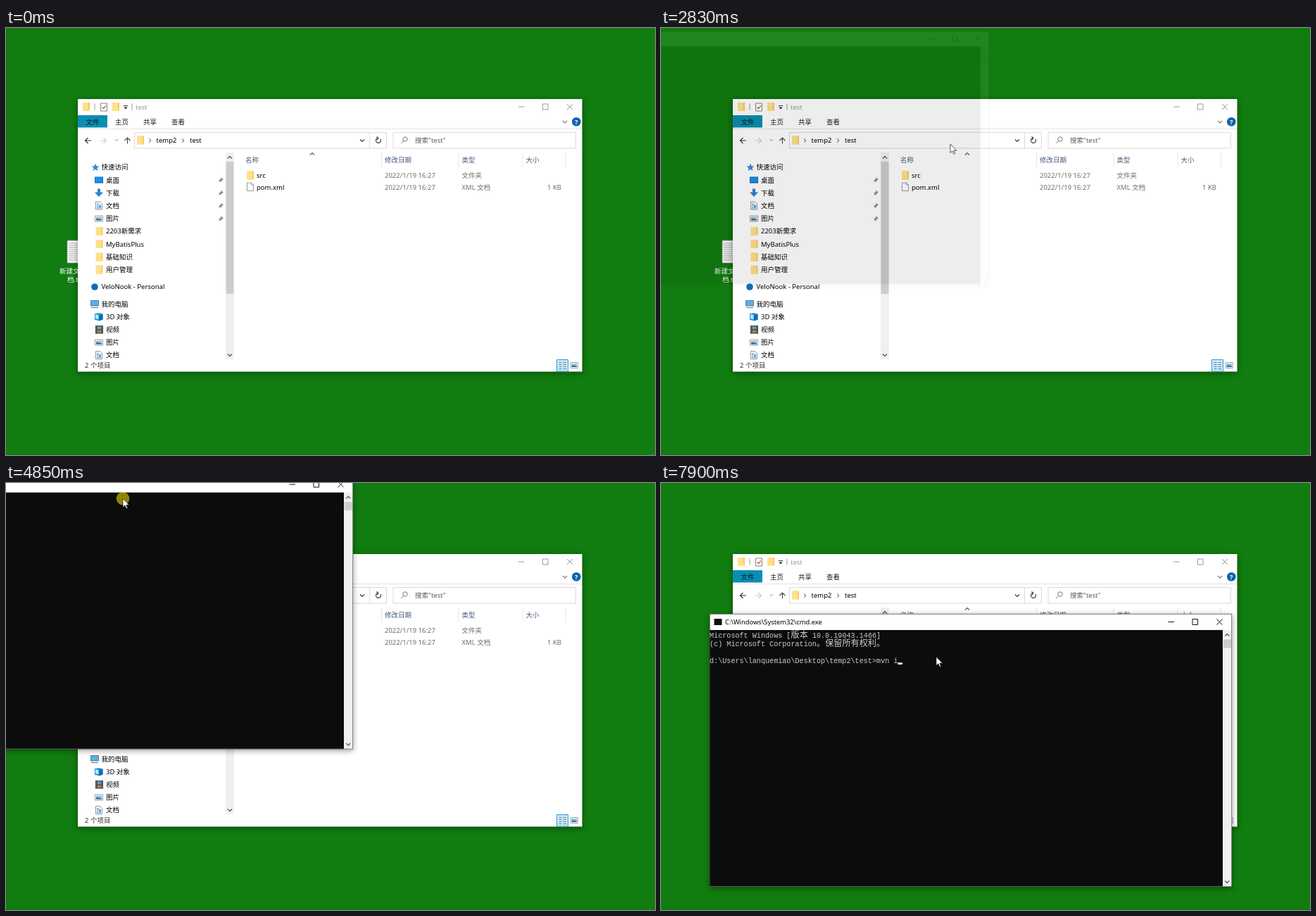
An HTML page for the animation above (8000 ms loop, 922 px wide and 607 px high).

```html
<!DOCTYPE html>
<html lang="zh-CN">
<head>
<meta charset="utf-8">
<title>Open a console in a folder</title>
<style>
html, body { margin: 0; width: 100%; height: 100%; overflow: hidden; background: #117c10; }
svg { display: block; }
#stage { width: 100vw; height: 100vh; }
text { font: 9.5px "Noto Sans", "Noto Sans CJK SC", "Noto Sans CJK", sans-serif; white-space: pre; }
.head { fill: #43597a; }
.dim { fill: #6d6d6d; }
.line { fill: none; stroke: currentColor; }
.edge { fill: none; stroke: #d9d9d9; }
.mono text { font: 10.13px "Liberation Mono", monospace; fill: #ccc; }
.mono .cjk { font: 300 12.15px "Noto Sans CJK SC", "Noto Sans CJK", sans-serif; }
.shade { filter: drop-shadow(0 2px 4px rgba(0,0,0,.4)); }
.ime text { fill: #1f76dc; font-size: 13px; }
.ime .n { font-size: 9.5px; }
.ime .first { fill: #f0321e; font-size: 14.5px; }
.ime .pale { fill: #e3a9a4; font-size: 9.5px; }

/* 1% of the loop is 80 ms */
.a { animation: 8s step-end infinite; }
.title { animation-name: title; }
.focus { animation-name: focus; }
.crumbs { animation-name: crumbs; }
.edit { animation-name: edit; }
.path { animation-name: path; }
.go { animation-name: go; }
.reload { animation-name: reload; }
.c { animation-name: c; }
.cm { animation-name: cm; }
.cmd { animation-name: cmd; }
.tall { animation-name: tall; }
.short { animation-name: short; }
.hover1 { animation-name: hover1; }
.hover2 { animation-name: hover2; }
.drag { animation-name: drag; }
.open { animation-name: open; animation-timing-function: linear; transform-origin: 371px 194px; }
.mvn { animation-name: mvn; }
.i { animation-name: i; }
.caret { animation-name: caret; }
.ime1 { animation-name: ime1; }
.ime2 { animation-name: ime2; }
.ime3 { animation-name: ime3; }
.move { animation-name: move; }
.arrow { animation-name: arrow; }
.beam { animation-name: beam; }
.press { animation-name: press; }

@keyframes title { 0%, 35.25%, 100% { color: #999 } 11.125% { color: #111 } }
@keyframes focus { 0%, 35.25%, 100% { opacity: 0 } 11.125% { opacity: 1 } }
@keyframes crumbs { 0%, 32.75%, 100% { opacity: 1 } 12% { opacity: 0 } }
@keyframes edit { 0%, 32.75%, 100% { opacity: 0 } 12% { opacity: 1 } }
@keyframes path { 0%, 21.125%, 100% { opacity: 0 } 12% { opacity: 1 } }
@keyframes go { 0%, 32.75%, 100% { opacity: 0 } 21.125% { opacity: 1 } }
@keyframes reload { 0%, 32.75%, 100% { opacity: 1 } 21.125% { opacity: 0 } }
@keyframes c { 0%, 23.625%, 100% { opacity: 0 } 21.125% { opacity: 1 } }
@keyframes cm { 0%, 25.25%, 100% { opacity: 0 } 23.625% { opacity: 1 } }
@keyframes cmd { 0%, 32.75%, 100% { opacity: 0 } 25.25% { opacity: 1 } }
@keyframes tall { 0%, 26.125%, 100% { opacity: 0 } 22% { opacity: 1 } }
@keyframes short { 0%, 32.75%, 100% { opacity: 0 } 26.125% { opacity: 1 } }
@keyframes hover1 { 0%, 8.1%, 100% { opacity: 0 } 7.1% { opacity: 1 } }
@keyframes hover2 { 0%, 7.1%, 100% { opacity: 0 } 6.1% { opacity: 1 } }
@keyframes open {
  0%, 35.25% { opacity: 0; transform: scale(.92) }
  36.125% { opacity: .45; transform: scale(.965) }
  37% { opacity: .81; transform: scale(.991) }
  38.5%, 100% { opacity: 1; transform: scale(1) }
}
@keyframes drag {
  0% { transform: translate(-249px, -9.5px) }
  61.5% { transform: translate(-153px, 55.5px) }
  62.25% { transform: translate(-13px, 146.5px) }
  63.125% { transform: translate(67px, 197.5px) }
  64% { transform: translate(70px, 189.5px) }
  64.875%, 100% { transform: translate(69px, 186px) }
}
@keyframes mvn { 0% { opacity: 0 } 91.25%, 100% { opacity: 1 } }
@keyframes i { 0% { opacity: 0 } 98.75%, 100% { opacity: 1 } }
@keyframes caret {
  0%, 75.5%, 88.75% { opacity: 0; transform: none }
  68.875%, 82.125% { opacity: 1; transform: none }
  91.25% { opacity: 1; transform: translateX(18.2px) }
  95.375% { opacity: 0; transform: translateX(24.3px) }
  96.25% { opacity: 1; transform: translateX(24.3px) }
  98.75%, 100% { opacity: 1; transform: translateX(30.4px) }
}
@keyframes ime1 { 0%, 84.625%, 100% { opacity: 0 } 82.125% { opacity: 1 } }
@keyframes ime2 { 0%, 86.25%, 100% { opacity: 0 } 84.625% { opacity: 1 } }
@keyframes ime3 { 0%, 91.25%, 100% { opacity: 0 } 86.25% { opacity: 1 } }
@keyframes move {
  0% { transform: translate(330px, 441px) }
  .875% { transform: translate(330px, 441px); animation-timing-function: ease-in-out }
  6.5% { transform: translate(412px, 228px); animation-timing-function: linear }
  10.25% { transform: translate(411px, 168px) }
  11.125% { transform: translate(411px, 165px) }
  49.625% { transform: translate(411px, 165px); animation-timing-function: ease-in-out }
  59% { transform: translate(149px, 9px) }
  60.625% { transform: translate(166px, 22px) }
  61.5% { transform: translate(245px, 74px) }
  62.25% { transform: translate(385px, 165px) }
  63.125% { transform: translate(465px, 216px) }
  64% { transform: translate(468px, 208px) }
  64.875% { transform: translate(467px, 204px) }
  67.375% { transform: translate(467px, 204px); animation-timing-function: ease-in-out }
  72% { transform: translate(425px, 318px); animation-timing-function: ease-in-out }
  76.125%, 100% { transform: translate(391px, 247px) }
}
@keyframes arrow { 0%, 11.125% { opacity: 0 } .875%, 33.625%, 100% { opacity: 1 } }
@keyframes beam { 0%, 21.125%, 33.625%, 100% { opacity: 0 } 11.125%, 28.625% { opacity: 1 } }
@keyframes press { 0%, 13%, 67.375%, 100% { opacity: 0 } 11.125%, 60.625% { opacity: 1 } }
</style>
</head>
<body>
<svg id="stage" viewBox="0 0 922 607">
<defs>
  <g id="folder"><path d="M1 0h9v12H1z" fill="#f3ca5c"/><path d="M0 0h8v9l2 3H0z" fill="#ffe08a"/></g>
  <g id="file"><path d="M.5.5h6l3 3v8.500h-9z" fill="#fff" stroke="#8c8c8c" stroke-width=".9"/><path d="M6.500.5v3h3" class="line" color="#8c8c8c" stroke-width=".8"/></g>
  <g id="doc"><path d="M1.500.5h6l3 3v8h-9z" fill="#fff" stroke="#7d8b98" stroke-width=".9"/><path d="M3 3.500h3M3 5.500h6M3 7.500h2M3 9.500h6" stroke="#4b8fc4"/><path d="M6 6.500h3v2H6z" fill="#3f86c0"/></g>
  <g id="pic"><path d="M.5.5h11v8H.5z" fill="#fff" stroke="#8795a1" stroke-width=".9"/><path d="M2 2h8v5H2z" fill="#8fc4e8"/><path d="M2 4l4 1 4 .5V7H2z" fill="#39668a"/></g>
  <g id="screen"><path d="M0 0h12v9H0z" fill="#0b5fae"/><path d="M.7.7h10.600v7H.7z" fill="#1893ee"/></g>
  <path id="pin" d="M4 0l3.500 3.500-1.500.4-1.600 1.700-.2 1.800-1.500-1.500L0 8l2-2.800L.6 3.800l1.800-.2L4 2z" fill="#878c92"/>
  <path id="down" d="M-3-1.500L0 1.500 3-1.500" class="line" stroke-width="1.1"/>
  <path id="up" d="M-3 1.500L0-1.500 3 1.500" class="line" stroke-width="1.1"/>
  <path id="right" d="M-1.300-2.500L1.300 0-1.300 2.500" class="line"/>
  <path id="left-arrow" d="M9 0H.5M4.500-4L.5 0l4 4" class="line" stroke-width="1.1"/>
  <path id="controls" d="M0 0h8.500M34.500-4H42v8h-7.500zM69-4l8 8M77-4l-8 8" class="line"/>
  <g id="ime-tools">
    <circle cx="524" cy="269" r="8" fill="#fcdcd4"/>
    <g color="#1f76dc"><use href="#right" x="503" y="289" color="#c9dcf2" transform="rotate(180 503 289)"/><use href="#right" x="514" y="289"/><use href="#down" x="526" y="289"/></g>
  </g>
</defs>

<rect width="922" height="607" fill="#117c10"/>

<g id="desktop">
  <path d="M87 302h25v32H87z" fill="#fff" stroke="#8a8a8a" stroke-width=".8"/>
  <path d="M89 306h20M89 309h20M89 312h20M89 315h20M89 318h20M89 321h20M89 324h20M89 327h20M89 330h20" stroke="#9a9a9a" stroke-width=".9"/>
  <g fill="#fff"><text x="76" y="348.500">新建文本文</text><text x="87" y="361">档.txt</text></g>
</g>

<g id="explorer">
  <rect x="102" y="101" width="716.500" height="387.500" fill="#fff" class="shade"/>
  <rect x="101.500" y="100.500" width="717.500" height="388.500" fill="none" stroke="#2c5a30" class="a focus"/>

  <use href="#folder" x="109" y="106"/>
  <path d="M126 107.500v9M179 107.500v9" stroke="#999"/>
  <path d="M134.500 107h9v11h-9z" fill="#fff" stroke="#777" stroke-width=".9"/>
  <path d="M136.500 112.500l2 2 3.500-4" class="line" color="#b36a2e" stroke-width="1.200"/>
  <use href="#folder" x="151" y="106"/>
  <path d="M167 110.500h6" stroke="#333"/><path d="M167.200 112.500h5.600L170 115.500z" fill="#333"/>
  <g class="a title"><text x="184" y="115.500" fill="currentColor">test</text><use href="#controls" x="728" y="112"/></g>

  <path d="M102 124h42v17.500h-42z" fill="#0a8fb2"/>
  <g fill="#1d1d1d"><text x="113.500" y="136.500" fill="#04181f">文件</text><text x="155" y="136.500">主页</text><text x="195" y="136.500">共享</text><text x="235" y="136.500">查看</text></g>
  <use href="#down" x="794" y="133.500" color="#777"/>
  <circle cx="810.300" cy="133.300" r="6.300" fill="#0a63ae"/><text x="810.300" y="137" text-anchor="middle" fill="#fff" style="font-weight:700">?</text>
  <path d="M102 143.500h716" stroke="#e3e3e3"/>

  <use href="#left-arrow" x="112" y="160" color="#333"/>
  <use href="#left-arrow" x="134" y="160" color="#ccc" transform="rotate(180 138.500 160)"/>
  <use href="#down" x="157" y="159.500" color="#666" transform="translate(47.100 47.850) scale(.7)"/>
  <use href="#left-arrow" x="168" y="160" color="#444" transform="rotate(90 172.500 160)"/>

  <path d="M182.500 148.500h358v22.500h-358zM516.500 148.500v22.500M550 148.500h259.500v22.500H550z" class="edge"/>
  <g class="a crumbs">
    <use href="#folder" x="186" y="153.500"/>
    <g color="#333"><use href="#right" x="204.500" y="160"/><use href="#right" x="251.500" y="160"/><use href="#down" x="506" y="160"/></g>
    <text x="213.500" y="163">temp2</text><text x="261" y="163">test</text>
  </g>
  <g color="#333"><path class="a line reload" d="M532 158a3.500 3.500 0 1 1-4-1.500M526.500 154.500l2.500 2-2 2.500" stroke-width="1.100"/></g>
  <circle cx="567" cy="158" r="3.200" class="line" color="#777"/><path d="M564.800 160.300l-3.300 3.500" stroke="#777"/>
  <text x="581" y="163" fill="#5c5c5c">搜索"test"</text>

  <use href="#up" x="435" y="179" color="#555"/>
  <path d="M533.500 177v21M643 177v21M734 177v21M795 177v21" stroke="#e4e4e4"/>
  <g class="head"><text x="340" y="190.500">名称</text><text x="538" y="190.500">修改日期</text><text x="647.500" y="190.500">类型</text><text x="738.500" y="190.500">大小</text></g>

  <rect x="336" y="202" width="456" height="16" fill="#e5f3ff" class="a hover1"/>
  <rect x="336" y="218" width="456" height="16" fill="#e5f3ff" class="a hover2"/>
  <use href="#folder" x="342" y="203.500"/><use href="#file" x="342" y="219.500"/>
  <text x="356" y="213.300">src</text><text x="356" y="229.500">pom.xml</text>
  <g class="dim">
    <text x="538" y="213.300">2022/1/19 16:27</text><text x="647.500" y="213.300">文件夹</text>
    <text x="538" y="229.500">2022/1/19 16:27</text><text x="647.500" y="229.500">XML 文档</text><text x="789" y="229.500" text-anchor="end">1 KB</text>
  </g>

  <path d="M127 192.500l1.500 3.700 4 .2-3.100 2.500 1.200 4-3.600-2.200-3.300 2.300 1-4-3-2.500 3.900-.3z" fill="#3089d6"/>
  <use href="#screen" x="126" y="211.500"/>
  <path d="M130 228.500h4v5h4l-6 6.500-6-6.500h4z" fill="#2c82d2"/>
  <use href="#doc" x="126" y="246.500"/><use href="#pic" x="126" y="266.500"/>
  <use href="#folder" x="127.500" y="283"/><use href="#folder" x="127.500" y="301"/><use href="#folder" x="127.500" y="319.500"/><use href="#folder" x="127.500" y="337.500"/>
  <use href="#pin" x="301.500" y="212"/><use href="#pin" x="301.500" y="230.500"/><use href="#pin" x="301.500" y="248.500"/><use href="#pin" x="301.500" y="267"/>
  <circle cx="126" cy="368" r="4.800" fill="#0f6cbd"/>
  <path d="M120 387h12v8.500h-12z" fill="#6b7883"/><path d="M121 388h10v6.500h-10z" fill="#52b1ee"/><path d="M121 397.500h10" stroke="#6b7883"/>
  <path d="M126 406l6.500-1 5 1.500v8l-5 1.800-6.500-1.500z" fill="#2196dc"/><path d="M132 408.500l5.500-2v8l-5.500 1.800z" fill="#0b6fb4"/><path d="M127 407l4.500 1.300v6L127 413z" fill="#b9e4fb"/>
  <path d="M127 423h11v11.500h-11z" fill="#33383d"/><path d="M129.500 424h6v4.500h-6z" fill="#6b96b4"/><path d="M129.500 429.500h6v4h-6z" fill="#a0835c"/><path d="M128.200 424v10M136.800 424v10" stroke="#ccc" stroke-width=".8" stroke-dasharray="1 1"/>
  <use href="#pic" x="126" y="442.500"/><use href="#doc" x="126" y="459"/>
  <g>
    <text x="135.500" y="201.300">快速访问</text><text x="142" y="219.500">桌面</text><text x="142" y="237.700">下载</text><text x="142" y="256">文档</text><text x="142" y="274.200">图片</text>
    <text x="142" y="292.300">2203新需求</text><text x="142" y="310.500">MyBatisPlus</text><text x="142" y="328.700">基础知识</text><text x="142" y="347">用户管理</text>
    <text x="135.500" y="371.300">VeloNook - Personal</text><text x="135.500" y="395.500">我的电脑</text>
    <text x="142" y="413.700">3D 对象</text><text x="142" y="432">视频</text><text x="142" y="450.200">图片</text><text x="142" y="468.400">文档</text>
  </g>
  <path d="M312 177h12v294h-12z" fill="#f0f0f0"/><path d="M312.500 190h11v188h-11z" fill="#cdcdcd"/>
  <g color="#444"><use href="#up" x="318" y="184"/><use href="#down" x="318" y="465"/></g>

  <text x="112" y="483.300" fill="#333">2 个项目</text>
  <path d="M782.500 471.500h16v16.500h-16z" fill="#cbe8f6" stroke="#26a0da"/>
  <path d="M785.500 475.500h4M785.500 478.500h4M785.500 481.500h4M785.500 484.500h4M791.500 475.500h4.500M791.500 478.500h4.500M791.500 481.500h4.500M791.500 484.500h4.500" stroke="#5d7382" stroke-width=".9"/>
  <use href="#pic" x="802" y="475" transform="translate(80.200 0) scale(.9 1)"/>

  <g class="a edit">
    <path d="M183.500 148.500h333v22.500h-333z" fill="#fff" stroke="#2f7fcb"/>
    <use href="#folder" x="187" y="153.500"/><use href="#down" x="504" y="160" color="#333"/>
  </g>
  <g class="a path"><path d="M201 154h188v12.500H201z" fill="#0078d7"/><text x="201.500" y="163.500" fill="#fff">d:\Users\lanquemiao\Desktop\temp2\test</text></g>
  <g class="a go"><use href="#left-arrow" x="524.500" y="160" color="#444" transform="rotate(180 529 160)"/></g>
  <g class="a tall">
    <path d="M201.500 166.500h289v110h-289z" fill="#fff" stroke="#777" class="shade"/>
    <text x="206" y="177.500">cmd</text>
  </g>
  <g class="a short">
    <path d="M201.500 166.500h289v42h-289z" fill="#fff" stroke="#666" class="shade"/>
    <text x="206" y="177.500">cmd</text><text x="206" y="191.300">搜索 "cmd"</text>
    <path d="M487 202.500h1.500M484.500 204.500h4M482 206.500h6.500" stroke="#aaa" stroke-dasharray="1.500 1"/>
  </g>
  <g class="a c"><text x="201.500" y="163.500">c</text><path d="M206.500 154v12" stroke="#111"/></g>
  <g class="a cm"><text x="201.500" y="163.500">cm</text><path d="M215.500 154v12" stroke="#111"/></g>
  <g class="a cmd"><text x="201.500" y="163.500">cmd</text><path d="M220.800 154v12" stroke="#111"/></g>
</g>

<g id="console" class="a drag"><g class="a open">
  <rect width="742" height="388" fill="#fff" class="shade"/>
  <path d="M0 23h729v364.500H0z" fill="#0c0c0c"/>
  <path d="M729 23h12.500v364.500H729z" fill="#f0f0f0"/><path d="M730 36.500h11v12h-11z" fill="#cdcdcd"/>
  <rect x=".25" y=".25" width="741.500" height="387.500" fill="none" stroke="#3d4a3d" stroke-width=".7"/>
  <rect x="6.500" y="7" width="11" height="9" fill="#111"/>
  <text x="22" y="14.800" style="font-size:9.350px">C:\Windows\System32\cmd.exe</text>
  <use href="#controls" x="651.500" y="11.500" color="#111"/>
  <g color="#444"><use href="#up" x="735.300" y="30"/><use href="#down" x="735.300" y="381"/></g>
  <g class="mono">
    <text x="0" y="33.500">Microsoft Windows [</text><text x="115.500" y="34" class="cjk">版本</text><text x="145.900" y="33.500">10.0.19043.1466]</text>
    <text x="0" y="45.700">(c) Microsoft Corporation</text><text x="152" y="46.200" class="cjk">。保留所有权利。</text>
    <text x="0" y="70">d:\Users\lanquemiao\Desktop\temp2\test&gt;</text>
    <text x="237.100" y="70" class="a mvn">mvn</text><text x="261.400" y="70" class="a i">i</text>
  </g>
  <rect x="237" y="69.300" width="6.500" height="2.700" fill="#f4f4f4" class="a caret"/>
</g></g>

<g class="ime">
  <g class="a ime1">
    <path d="M313.500 259h213v41h-213z" fill="#fff" stroke="#86b7ea" stroke-width=".8"/>
    <use href="#ime-tools" x="-9"/>
    <text x="322" y="272" style="font-size:12px">m</text><path d="M333.500 262v12" stroke="#333" stroke-width=".8"/>
    <text x="322" y="292" class="pale">1</text><text x="331" y="292.500" style="fill:#f0321e">吗</text>
    <text y="292"><tspan x="355" class="n">2</tspan><tspan x="364">嘛</tspan><tspan x="388" class="n">3</tspan><tspan x="397">没</tspan><tspan x="421" class="n">4</tspan><tspan x="430">名</tspan><tspan x="455" class="n">5</tspan><tspan x="464">们</tspan></text>
  </g>
  <g class="a ime2">
    <path d="M313.500 259h222.500v41h-222.500z" fill="#fff" stroke="#86b7ea" stroke-width=".8"/>
    <use href="#ime-tools"/>
    <text x="322" y="272" style="font-size:11px">mv</text><path d="M338 262v12" stroke="#333" stroke-width=".8"/>
    <text x="322" y="292" class="pale">1</text><text x="331" y="292.500" class="first">MV</text>
    <text y="292"><tspan x="364.500" class="n">2</tspan><tspan x="373.500">吗</tspan><tspan x="398" class="n">3</tspan><tspan x="407">嘛</tspan><tspan x="431" class="n">4</tspan><tspan x="440">没</tspan><tspan x="465" class="n">5</tspan><tspan x="474">名</tspan></text>
  </g>
  <g class="a ime3">
    <path d="M313.500 259h247v41h-247z" fill="#fff" stroke="#86b7ea" stroke-width=".8"/>
    <use href="#ime-tools" x="24.500"/>
    <text x="322" y="272" style="font-size:11px">mvn</text><path d="M345 262v12" stroke="#333" stroke-width=".8"/>
    <text x="322" y="292" class="pale">1</text><text x="331" y="292.500" class="first">MVN</text>
    <text y="292"><tspan x="375.500" class="n">2</tspan><tspan x="384.500">每年</tspan><tspan x="422" class="n">3</tspan><tspan x="431">嘛</tspan><tspan x="455" class="n">4</tspan><tspan x="464">没</tspan><tspan x="489" class="n">5</tspan><tspan x="498">名</tspan></text>
  </g>
</g>

<g id="pointer" class="a move">
  <g class="a press"><circle r="9.300" fill="#f2e600" fill-opacity=".56"/></g>
  <path class="a arrow" d="M0 0V12.500L2.900 9.800 4.900 14.300 6.800 13.500 4.900 9.200H8.800Z" fill="#fff" stroke="#111" stroke-width=".7"/>
  <path class="a beam line" d="M-1.800-5h2l.6.700.6-.7h2M.8-4.500V6.500M-1.800 7h2l.6-.7.6.7h2" color="#111"/>
</g>
</svg>
</body>
</html>
```
